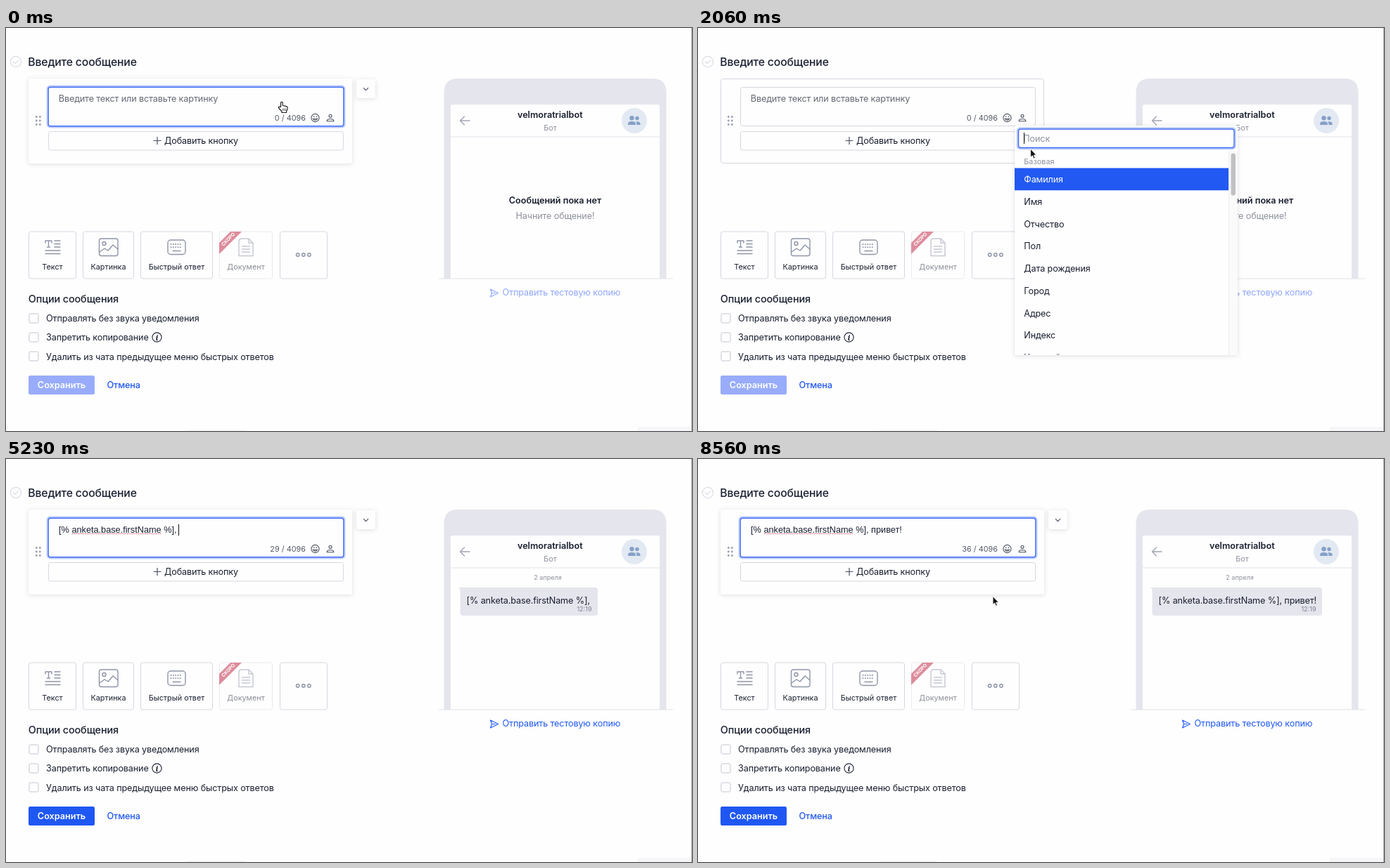
Animation of 975 by 574 pixels, one loop 8.6 s. Source, as an HTML page:

```html
<!DOCTYPE html>
<html lang="ru">
<head>
<meta charset="utf-8">
<style>
html, body { margin: 0; width: 100%; height: 100%; overflow: hidden; background: #fefefe; }
svg { display: block; width: 975px; height: 574px; font: 12.65px Inter, sans-serif; letter-spacing: -.011em; fill: #1a1f30; }
text { white-space: pre; }
.line { fill: none; stroke: #d6d7e0; }
.icon { fill: none; stroke: #8f94a8; stroke-width: 1.4; stroke-linecap: round; stroke-linejoin: round; }
.dark { fill: none; stroke: #4c5060; stroke-width: 1.1; }
.focus { fill: #fefefe; stroke: #3f6bf5; stroke-width: 1.4; }
.halo { fill: none; stroke: #bccbfc; stroke-width: 2.2; }
.head, .med { font-weight: 500; }
.bold { font-weight: 600; letter-spacing: 0; }
.mid { text-anchor: middle; }
.end { text-anchor: end; }
.small { font-size: 10.85px; letter-spacing: 0; }
.tiny { font-size: 9.05px; letter-spacing: 0; }
.gray { fill: #8e919e; }
.soft { filter: drop-shadow(0 1px 3px #1d223326); }
</style>
</head>
<body>
<svg viewBox="0 0 975 574">
  <path d="M974.5 0V574" stroke="#a3a4aa"/>
  <path d="M257 572h83v2h-83zM898 568h76v6h-76z" fill="#f6f6f9"/>

  <g class="icon" style="stroke:#dcdde4;stroke-width:1.2"><circle cx="14" cy="48" r="7.6"/><path d="M10.5 48l2.6 2.6 4.6-5"/></g>
  <text class="head" x="31.3" y="54" font-size="15.75">Введите сообщение</text>

  <!-- message card -->
  <rect id="cardSoft" class="soft" x="32" y="72" width="460" height="121" rx="3" fill="#fefefe"/>
  <rect id="cardLine" class="line" x="32.5" y="72.5" width="459" height="120" rx="3"/>
  <g id="dots" fill="#9a9dad"></g>
  <rect class="line" x="60.5" y="84.5" width="419" height="55" rx="3"/>
  <g id="areaFocus">
    <rect class="halo" x="58.7" y="82.7" width="422.6" height="58.6" rx="4"/>
    <rect class="focus" x="60.2" y="84.2" width="419.6" height="55.6" rx="3"/>
  </g>
  <text id="hint" x="74.8" y="105.3" fill="#656874">Введите текст или вставьте картинку</text>
  <text id="typed" x="75" y="105.3" style="font:12.73px 'Liberation Sans',Arial,sans-serif;letter-spacing:0"></text>
  <path id="spell" d="M94 106.5H220" stroke="#e2485c" stroke-width="1.2" stroke-dasharray="1.4 1.2"/>
  <rect id="caret" y="93" width="1" height="16" fill="#111"/>
  <rect id="iconHover" x="450" y="117" width="22" height="22" rx="3" fill="#dedfe4"/>
  <text id="count" class="small end" x="426" y="132" fill="#555967"></text>
  <g class="dark">
    <circle cx="439.5" cy="128" r="5.6"/><path d="M436.5 129.3q3 3.6 6 0z"/>
    <path d="M437.6 125.5v1.4M441.4 125.5v1.4" stroke-width="1.4"/>
    <circle cx="461" cy="125.2" r="2"/><path d="M456.2 132.7q0-3 3-3h3.6q3 0 3 3z"/>
  </g>
  <rect class="line" x="60.5" y="147.5" width="419" height="26.5" rx="3"/>
  <path d="M209.5 160.5h11M215 155v11" stroke="#4c5060" stroke-width="1.2"/>
  <text x="225" y="165">Добавить кнопку</text>
  <g id="chevron">
    <rect class="soft" x="498" y="73" width="27" height="27" rx="3" fill="#fefefe"/>
    <path class="dark" d="M508 85.2l3.5 3.5 3.5-3.5" stroke-width="1.3"/>
  </g>

  <!-- block buttons -->
  <g id="tools"></g>
  <g class="icon">
    <path d="M56 306v-3h9v3M60.5 303v9M58.5 312h4M69 303h8M69 307.5h8M69 312h8M56 317h21M56 321.5h21"/>
    <rect x="132.5" y="300" width="26.5" height="24.5" rx="3"/><circle cx="139.5" cy="307" r="2.5"/>
    <path d="M133 319l7-5 5 3 7-8 7 6"/>
    <rect x="230" y="302" width="25" height="20.5" rx="4"/>
    <path d="M234.5 308h16.5M234.5 312.2h16.5" stroke-dasharray=".1 3.2" stroke-width="1.9"/><path d="M237 317.5h11"/>
    <path opacity=".5" d="M335 300h10l6 6v18.5h-20v-20.5q0-4 4-4zM345 300v6h6M335.5 311h11M335.5 315h11M335.5 319h11"/>
    <circle cx="414.7" cy="323" r="2.2"/><circle cx="422.8" cy="323" r="2.2"/><circle cx="430.9" cy="323" r="2.2"/>
  </g>
  <path d="M303 306l16-16h16l-32 32z" fill="#dd8c9c"/>
  <text class="mid" transform="translate(317.5 302.5) rotate(-45)" font-size="6.8" font-weight="700" fill="#fff">СКОРО</text>

  <!-- options -->
  <text class="head" x="31.8" y="391" font-size="14.45">Опции сообщения</text>
  <g id="options"></g>
  <circle class="dark" cx="214.5" cy="440.5" r="6.6" style="stroke:#1d2233"/>
  <text class="mid" x="214.5" y="444.7" style="font:italic 700 11px 'Noto Serif',serif">i</text>
  <rect id="save" x="32" y="495" width="94" height="27" rx="2.5"/>
  <text class="bold mid" x="79" y="513.3" fill="#fff">Сохранить</text>
  <text class="med" x="143.5" y="513.3" fill="#1f57f3">Отмена</text>

  <!-- phone -->
  <path d="M622.5 357V92q0-20 20-20h276q20 0 20 20v265z" fill="#e5e5ed"/>
  <path d="M632 357V112q0-3 3-3h291q3 0 3 3v245z" fill="#fefefe"/>
  <path class="line" d="M615 357h333M632 155h297" style="stroke:#e1e2e9"/>
  <path class="icon" d="M659 132h-13M651.5 126l-6 6 6 6" style="stroke:#a2a5b3"/>
  <text class="bold mid" x="773.3" y="128">velmoratrialbot</text>
  <text class="small gray mid" x="773.5" y="145.5">Бот</text>
  <circle cx="893" cy="132" r="18" fill="#e2e9f2"/>
  <g fill="#86a0c8"><circle cx="889.5" cy="128.3" r="3.2"/><circle cx="897" cy="128.5" r="2.7"/>
    <path d="M884 138v-1.6q0-3.4 5.5-3.4t5.5 3.4v1.6zM896.3 138v-2q0-1.6-1.3-2.7 6.5-.6 6.5 3v1.7z"/></g>
  <g id="empty">
    <text class="bold mid" x="780.5" y="249.5">Сообщений пока нет</text>
    <text class="gray mid" x="780.5" y="272">Начните общение!</text>
  </g>
  <g id="chat">
    <text class="tiny gray mid" x="770" y="172">2 апреля</text>
    <path d="M642.5 183h8v8h-4q0-6-4-8z" fill="#e5e5ed"/>
    <rect id="bubble" x="645.5" y="183" height="40" rx="4" fill="#e5e5ed"/>
    <text id="sent" x="654.5" y="205.8"></text>
    <text id="time" class="tiny end" y="217.3" fill="#7f8290">12:19</text>
  </g>
  <g id="send">
    <path d="M688.5 372l11 5.5-11 5.5 2-5.5zM690.5 377.5h5" fill="none" stroke="currentColor" stroke-width="1.1" stroke-linejoin="round"/>
    <text x="705.5" y="380.5" fill="currentColor">Отправить тестовую копию</text>
  </g>

  <!-- field picker -->
  <g id="tip">
    <path d="M379 90h164q3 0 3 3v16q0 3-3 3h-77l-5 5-5-5h-77q-3 0-3-3v-16q0-3 3-3z" fill="#2e2f33"/>
    <text class="mid" x="461" y="105.5" font-size="11.9" fill="#b7b8be">Добавить персонализацию</text>
  </g>
  <g id="menu">
    <rect class="soft" x="450" y="139" width="317" height="327" rx="2" fill="#fefefe"/>
    <rect class="line" x="455.5" y="144" width="306.5" height="26.5" rx="3"/>
    <g id="searchFocus">
      <rect class="halo" x="453.9" y="142.4" width="309.7" height="29.7" rx="4"/>
      <rect class="focus" x="455.5" y="144" width="306.5" height="26.5" rx="3"/>
    </g>
    <text x="462.3" y="162" class="gray">Поиск</text>
    <rect id="searchCaret" x="463" y="149" width="1" height="16" fill="#111"/>
    <text x="463.3" y="193.5" class="small gray">Базовая</text>
    <rect id="pick" x="450" width="304.5" height="31.7" fill="#2159f2"/>
    <clipPath id="clip"><path d="M450 139h317v326.5h-317z"/></clipPath>
    <g id="fields" clip-path="url(#clip)"></g>
    <path d="M754.5 175h12.5v290.5h-12.5z" fill="#fafafa"/><path d="M754.5 175v290.5" stroke="#ececee"/>
    <rect x="757.5" y="178.5" width="6.5" height="60" rx="3" fill="#c1c1c3"/>
  </g>

  <g id="cursor" stroke-linejoin="round">
    <g id="hand" fill="#fff" stroke="#222">
      <path stroke-width="1.2" d="M-1.5 7V1.2a1.4 1.4 0 0 1 2.8 0V5l2.3.3 2.2.6q2.6.6 2.4 2.5l-.7 3-.9 1.4V15H0v-1.5L-2.5 10.5-4.6 8q0-1.7 1.7-1.3z"/>
      <path d="M1.5 9v3.5M3.5 9v3.5M5.5 9v3.5" stroke-width=".7"/>
    </g>
    <path id="arrow" d="M0 0V12L2.7 9.5 4.5 13.8 6.5 13 4.7 8.8H8.4Z" fill="#111" stroke="#fff" stroke-width=".9"/>
    <path id="beam" d="M-2.5-6.5Q0-6.5 0-5V5Q0 6.5-2.5 6.5M2.5-6.5Q0-6.5 0-5M0 5Q0 6.5 2.5 6.5" fill="none" stroke="#222" stroke-width="1.1"/>
  </g>
</svg>
<script>
const LOOP = 8600, OPEN = 900, BLUR = 2660, INSERT = 2730, ROW = 31.72;
const $ = id => document.getElementById(id);
const show = (id, on) => $(id).style.display = on ? '' : 'none';
const set = (id, attrs) => { for (const k in attrs) $(id).setAttribute(k, attrs[k]); };

// time, added text, caret x, right edge of the bubble
const keys = [
  [INSERT, '[% anketa.base.firstName %]', 238, 834],
  [4800, ',', 242, 838], [5230, ' ', 245, 841],
  [5500, 'п', 252, 848.5], [5600, 'р', 259, 856],
  [5800, 'и', 266, 863], [5830, 'в', 273, 870],
  [6100, 'е', 280, 877], [6200, 'т', 287, 883.3], [6800, '!', 290, 887]
];

const smooth = u => u * u * (3 - 2 * u);
const speedUp = u => u ** 1.5;
const slowDown = u => 1 - (1 - u) ** 2;
// start, end, from, to, easing
const moves = [
  [30, 730, [392, 105.5], [465, 130], smooth],
  [1730, 2530, [465, 130], [485.5, 243.5], smooth],
  [2900, 3160, [485.5, 243.5], [336, 170.5], speedUp],
  [3160, 3500, [336, 170.5], [316, 103], slowDown],
  [8300, 8560, [316, 103], [419, 195.5], smooth]
];

$('dots').innerHTML = [43.3, 48.3].flatMap(x => [126.5, 132, 137.5].map(y =>
  `<circle cx="${x}" cy="${y}" r="1.4"/>`)).join('');

$('tools').innerHTML = [[32, 100, 'Текст'], [109, 182, 'Картинка'], [191, 294, 'Быстрый ответ'],
  [303, 379, 'Документ', .5], [389, 457, '']].map(([a, b, label, opacity = 1]) =>
  `<g opacity="${opacity}"><rect class="line" x="${a + .5}" y="290" width="${b - a - 1}" height="67" rx="3"/>
   <text class="small mid" x="${(a + b) / 2}" y="344.3">${label}</text></g>`).join('');

$('options').innerHTML = ['Отправлять без звука уведомления', 'Запретить копирование',
  'Удалить из чата предыдущее меню быстрых ответов'].map((label, i) =>
  `<rect class="line" x="33" y="${407 + 27 * i}" width="13" height="13" rx="1.5" style="stroke:#c3c5d0"/>
   <text x="57" y="${418.3 + 27.1 * i}">${label}</text>`).join('');

$('fields').innerHTML = ['Фамилия', 'Имя', 'Отчество', 'Пол', 'Дата рождения', 'Город', 'Адрес',
  'Индекс', 'Часовой пояс'].map((label, i) =>
  `<text x="463.3" y="${220.3 + ROW * i}">${label}</text>`).join('');

function cursorAt(t) {
  let pos = moves[0][2];
  for (const [a, b, from, to, ease] of moves) {
    if (t < a) break;
    const u = ease(Math.min(1, (t - a) / (b - a)));
    pos = from.map((v, i) => v + (to[i] - v) * u);
  }
  return pos;
}

function shapeAt(t, x, y) {
  if (t < 1730) return 'hand';
  if (t < INSERT) return y < 142 ? 'hand' : y < 171 ? 'beam' : 'arrow';
  if (x < 60 || x > 480) return 'arrow';
  if (y > 84 && y < 140) return 'beam';
  return y > 147 && y < 175 ? 'hand' : 'arrow';
}

const blink = (t, since) => Math.floor((t - since) / 500) % 2 == 0;

function draw(t) {
  const [x, y] = cursorAt(t), shape = shapeAt(t, x, y);
  const menu = t >= OPEN && t < INSERT, filled = t >= INSERT;
  const onIcon = t < 2300 && x > 450 && y < 140;

  set('cursor', { transform: `translate(${x} ${y})` });
  show('cursor', t < 4800 || t >= 7960);
  for (const id of ['hand', 'arrow', 'beam']) show(id, id == shape);

  show('menu', menu);
  show('searchFocus', t < BLUR);
  show('searchCaret', t < BLUR && blink(t, OPEN));
  const row = y > 231 ? 1 : 0;
  set('pick', { y: 199.5 + ROW * row });
  [...$('fields').children].forEach((el, i) => el.style.fill = i == row ? '#fff' : '');

  show('tip', onIcon);
  show('iconHover', onIcon);
  show('chevron', !menu || onIcon);
  show('cardSoft', !menu);
  show('cardLine', menu);
  show('areaFocus', !menu);

  const done = keys.filter(k => k[0] <= t), last = done[done.length - 1];
  const text = done.map(k => k[1]).join('');
  $('typed').textContent = $('sent').textContent = text;
  $('count').textContent = text.length + ' / 4096';
  show('hint', !filled);
  show('spell', t >= 3830);
  show('empty', !filled);
  show('chat', filled);
  if (last) {
    set('bubble', { width: last[3] - 645.5 });
    set('time', { x: last[3] - 8.5 });
  }
  set('caret', { x: last ? last[2] : 75 });
  show('caret', last ? blink(t, last[0]) : t >= 430 && t < OPEN);
  set('save', { fill: filled ? '#1f57f3' : '#98acfb' });
  $('send').style.color = filled ? '#1f57f3' : '#8fa6fa';
}

function frame() {
  draw(performance.now() % LOOP);
  requestAnimationFrame(frame);
}
frame();
</script>
</body>
</html>
```
